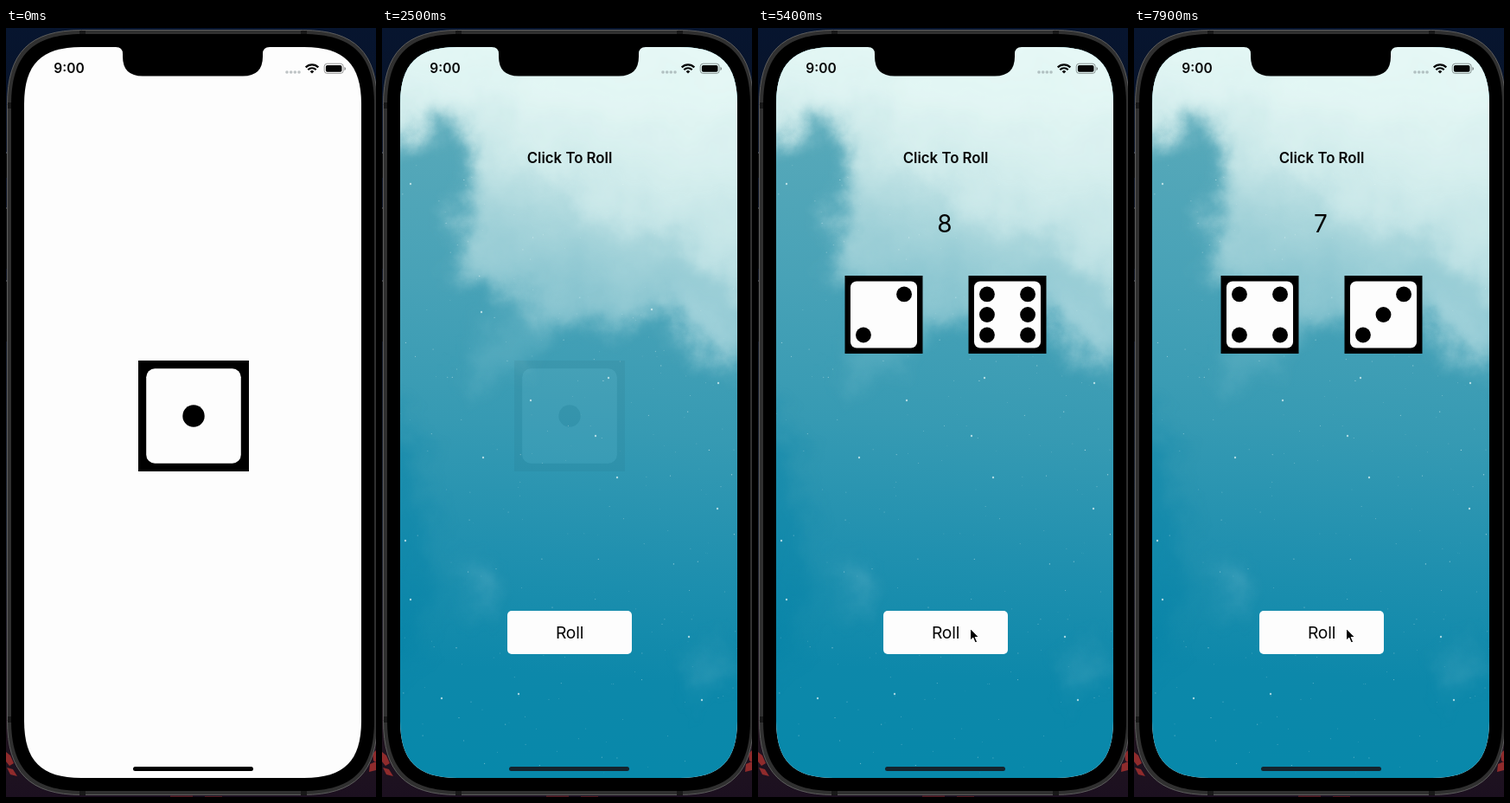
An HTML page for the animation above (8 s loop, 428 by 888 pixels).

```html
<!DOCTYPE html>
<html lang="en">
<head>
<meta charset="utf-8">
<title>Dice roller</title>
<style>
  html, body { margin: 0; width: 100%; height: 100%; overflow: hidden; background: #050505; }
  svg { position: absolute; left: 0; top: 0; width: 428px; height: 888px; display: block; }
  text { font-family: Inter, Roboto, "Liberation Sans", sans-serif; fill: #050505; }
  #sky { will-change: transform; }
</style>
</head>
<body>
<!-- Phone body -->
<svg viewBox="0 0 428 888">
  <defs>
    <linearGradient id="desk" x2="0" y2="1">
      <stop offset="0" stop-color="#07152f"/>
      <stop offset=".3" stop-color="#0a1020"/>
      <stop offset=".65" stop-color="#18202f"/>
      <stop offset=".9" stop-color="#21151f"/>
      <stop offset="1" stop-color="#1c1020"/>
    </linearGradient>
  </defs>
  <rect width="428" height="888" fill="url(#desk)"/>
  <g fill="#8f2b2c">
    <path d="M0 836l5 4 4 9-5 3-4-5zM1 854l7 2 5 8-8-2zM428 834l-4 4 1 8 3 2zM421 850l7-3v10l-8 2z"/>
    <path d="M190 886.500h26v1.500h-26zM230 887h20v1h-20z" opacity=".5"/>
  </g>
  <path d="M0 145h1.500v28H0zM0 208h1.500v70H0zM0 292h1.500v70H0z" fill="#08090b"/>
  <path d="M0 144h1.500M0 208h1.500M0 292h1.500" stroke="#6a6d70"/>
  <path id="shell" fill="#303030" stroke="#5d5d5d"/>
  <path d="M85 3h7v5h-7zM341 3h7v5h-7zM85 881h7v5h-7zM341 881h7v5h-7zM2 86h5v7H2zM2 795h5v7H2z" fill="#181818"/>
  <path id="bezel" fill="#000"/>
  <path id="blank" fill="#fdfdfd"/>
</svg>

<!-- Soft sky backdrop -->
<svg id="sky" viewBox="0 0 428 888">
  <defs>
    <clipPath id="clip"><path id="clipShape"/></clipPath>
    <linearGradient id="sea" gradientUnits="userSpaceOnUse" x1="250" y1="60" x2="190" y2="866">
      <stop offset="0" stop-color="#5dabba"/>
      <stop offset=".3" stop-color="#48a2b7"/>
      <stop offset=".5" stop-color="#369ab3"/>
      <stop offset=".68" stop-color="#2090af"/>
      <stop offset=".85" stop-color="#0d88aa"/>
      <stop offset="1" stop-color="#0788aa"/>
    </linearGradient>
    <linearGradient id="cloud" gradientUnits="userSpaceOnUse" x1="280" y1="22" x2="220" y2="390">
      <stop offset="0" stop-color="#e6f8f6"/>
      <stop offset=".33" stop-color="#d5eeed" stop-opacity=".95"/>
      <stop offset=".6" stop-color="#c2e3e5" stop-opacity=".75"/>
      <stop offset="1" stop-color="#b5dce1" stop-opacity=".4"/>
    </linearGradient>
    <filter id="wisp" filterUnits="userSpaceOnUse" x="-60" y="-60" width="560" height="900" color-interpolation-filters="sRGB">
      <feGaussianBlur stdDeviation="13" result="soft"/>
      <feTurbulence type="fractalNoise" baseFrequency=".016" numOctaves="5" seed="7" result="noise"/>
      <feDisplacementMap in="soft" in2="noise" scale="58" xChannelSelector="R" yChannelSelector="G"/>
    </filter>
  </defs>
  <g clip-path="url(#clip)">
    <rect x="21" y="22" width="390" height="844" fill="url(#sea)"/>
    <g filter="url(#wisp)">
      <path d="M-50-50H480V420L411 392 350 362 318 325 262 336 205 350 150 312 92 285 92 205 104 150 84 104 21 128-50 130z" fill="url(#cloud)"/>
      <path d="M180-50H480V350L395 300 330 235 225 205 150 130z" fill="#e2f5f3" opacity=".42"/>
      <path d="M-50-50H480V95L230 110 120 82-50 90z" fill="#e8f9f7" opacity=".35"/>
      <ellipse cx="372" cy="345" rx="52" ry="26" fill="#bfe1e5" opacity=".4" transform="rotate(25 372 345)"/>
      <ellipse cx="145" cy="370" rx="60" ry="26" fill="#9ccfd8" opacity=".22" transform="rotate(-35 145 370)"/>
      <ellipse cx="110" cy="648" rx="20" ry="28" fill="#8cc8d5" opacity=".25"/>
      <ellipse cx="376" cy="742" rx="18" ry="32" fill="#8cc8d5" opacity=".2"/>
      <ellipse cx="10" cy="590" rx="45" ry="150" fill="#0080a6" opacity=".4"/>
    </g>
    <g id="stars" fill="#e4f6f6"/>
  </g>
</svg>

<!-- Interface -->
<svg viewBox="0 0 428 888">
  <path d="M127 20V22Q135 22 135 30V33Q135 55.500 158 55.500H274Q297 55.500 297 33V30Q297 22 305 22V20z"/>
  <text x="73" y="52.300" font-size="15.500" font-weight="600" text-anchor="middle">9:00</text>
  <g fill="#808b8f" opacity=".5">
    <circle cx="325" cy="51" r="1.800"/><circle cx="329.700" cy="51" r="1.800"/>
    <circle cx="334.300" cy="51" r="1.800"/><circle cx="339" cy="51" r="1.800"/>
  </g>
  <g fill="none" stroke="#050505" stroke-width="2.200">
    <path d="M346.700 45.400a10.300 10.300 0 0 1 14.600 0M349.300 48.200a6.700 6.700 0 0 1 9.400 0"/>
    <path d="M354 52.600l-2.300-2.400a3.300 3.300 0 0 1 4.600 0z" fill="#050505" stroke="none"/>
  </g>
  <rect x="368.200" y="41.200" width="22" height="11.200" rx="3.200" fill="none" stroke="#050505" stroke-opacity=".4"/>
  <rect x="369.900" y="42.900" width="18.600" height="7.800" rx="1.800" fill="#050505"/>
  <path d="M391.500 45v4q1.500-.6 1.500-2t-1.500-2z" fill="#050505" opacity=".5"/>

  <g id="splash"></g>
  <g id="app">
    <text x="217" y="156.400" font-size="16.800" font-weight="600" text-anchor="middle">Click To Roll</text>
    <g id="result">
      <text id="total" x="216" y="236" font-size="28" text-anchor="middle"></text>
      <g id="left" transform="translate(100.500 286) scale(.703)"></g>
      <g id="right" transform="translate(243.500 286) scale(.703)"></g>
    </g>
    <rect x="145" y="673" width="144" height="50" rx="5" fill="#fdfdfd"/>
    <text x="217" y="705" font-size="19.300" letter-spacing="-.2" text-anchor="middle">Roll</text>
  </g>
  <rect id="home" x="147" y="853" width="139" height="5" rx="2.500"/>
  <path id="cursor" d="M0 0V14.500L3.300 11.400 5.700 17 8.200 15.900 5.800 10.500H10.300z" fill="#000" stroke="#fff" stroke-width="1.100" stroke-linejoin="round"/>
</svg>

<script>
const LOOP = 8000, APP_AT = 2500;
const rolls = [[4600, 2, 6], [6300, 5, 3], [7600, 4, 3]];
const path = [[3300, 436, 434], [3800, 317.5, 583], [4300, 245.5, 693]];
const $ = id => document.getElementById(id);
const show = (el, on) => el.setAttribute('visibility', on ? 'inherit' : 'hidden');

// Rounded box with continuous corners of length k
function squircle(x, y, w, h, k) {
  const c = k * 0.3, r = x + w, b = y + h;
  return `M${x} ${y + k}C${x} ${y + c} ${x + c} ${y} ${x + k} ${y}H${r - k}` +
    `C${r - c} ${y} ${r} ${y + c} ${r} ${y + k}V${b - k}` +
    `C${r} ${b - c} ${r - c} ${b} ${r - k} ${b}H${x + k}` +
    `C${x + c} ${b} ${x} ${b - c} ${x} ${b - k}z`;
}
$('shell').setAttribute('d', squircle(1.5, 2.5, 428, 883, 86));
$('bezel').setAttribute('d', squircle(6, 7, 420, 874, 82));
for (const id of ['blank', 'clipShape']) $(id).setAttribute('d', squircle(21, 22, 390, 844, 66));

// A 128-unit die
function die(n) {
  const a = 30.5, m = 64, z = 97.5, pips = [];
  if (n % 2) pips.push([m, m]);
  if (n > 1) pips.push([z, a], [a, z]);
  if (n > 3) pips.push([a, a], [z, z]);
  if (n === 6) pips.push([a, m], [z, m]);
  return '<rect width="128" height="128"/>' +
    '<rect x="9.2" y="9.2" width="109.6" height="109.6" rx="10" fill="#fdfdfd"/>' +
    pips.map(([x, y]) => `<circle cx="${x}" cy="${y}" r="12.7"/>`).join('');
}
$('splash').innerHTML = die(1);
$('splash').setAttribute('transform', 'translate(153 384)');

function scatter() {
  let seed = 11;
  const rnd = () => (seed = seed * 16807 % 2147483647) / 2147483647;
  const dot = (x, y, r, o) =>
    `<circle cx="${x.toFixed(1)}" cy="${y.toFixed(1)}" r="${r.toFixed(2)}" opacity="${o.toFixed(2)}"/>`;
  const bright = [[115, 328], [312, 325], [172, 430], [389, 410], [355, 703], [158, 769],
    [370, 776], [272, 519], [33, 180], [262, 404], [247, 471], [117, 496], [388, 555],
    [27, 592], [33, 660], [69, 774]];
  let out = bright.map(([x, y]) => dot(x, y, 1.2, 0.7)).join('');
  for (let i = 0; i < 260; i++) {
    out += dot(21 + rnd() * 390, 120 + rnd() * 745, 0.3 + rnd() * 0.4, 0.15 + rnd() * 0.45);
  }
  $('stars').innerHTML = out;
}
scatter();

function cursorAt(t) {
  const i = path.findIndex(p => t < p[0]);
  if (i < 0) return path[path.length - 1].slice(1);
  if (i === 0) return path[0].slice(1);
  const [t0, x0, y0] = path[i - 1], [t1, x1, y1] = path[i];
  const u = (t - t0) / (t1 - t0);
  return [x0 + (x1 - x0) * u, y0 + (y1 - y0) * u];
}

let shown = null;
function draw(t) {
  const inApp = t >= APP_AT;
  $('sky').style.visibility = inApp ? 'visible' : 'hidden';
  show($('app'), inApp);
  $('home').setAttribute('fill', inApp ? '#14232d' : '#000');
  $('splash').setAttribute('opacity', inApp ? (t < APP_AT + 100 ? 0.04 : 0) : 1);

  const roll = rolls.filter(r => t >= r[0]).pop();
  show($('result'), Boolean(roll));
  if (roll && roll !== shown) {
    const [, a, b] = roll;
    $('left').innerHTML = die(a);
    $('right').innerHTML = die(b);
    $('total').textContent = a + b;
    shown = roll;
  }

  show($('cursor'), t >= path[0][0]);
  $('cursor').setAttribute('transform', `translate(${cursorAt(t)})`);
}

const start = performance.now();
function tick() {
  draw((performance.now() - start) % LOOP);
  requestAnimationFrame(tick);
}
tick();
</script>
</body>
</html>
```
